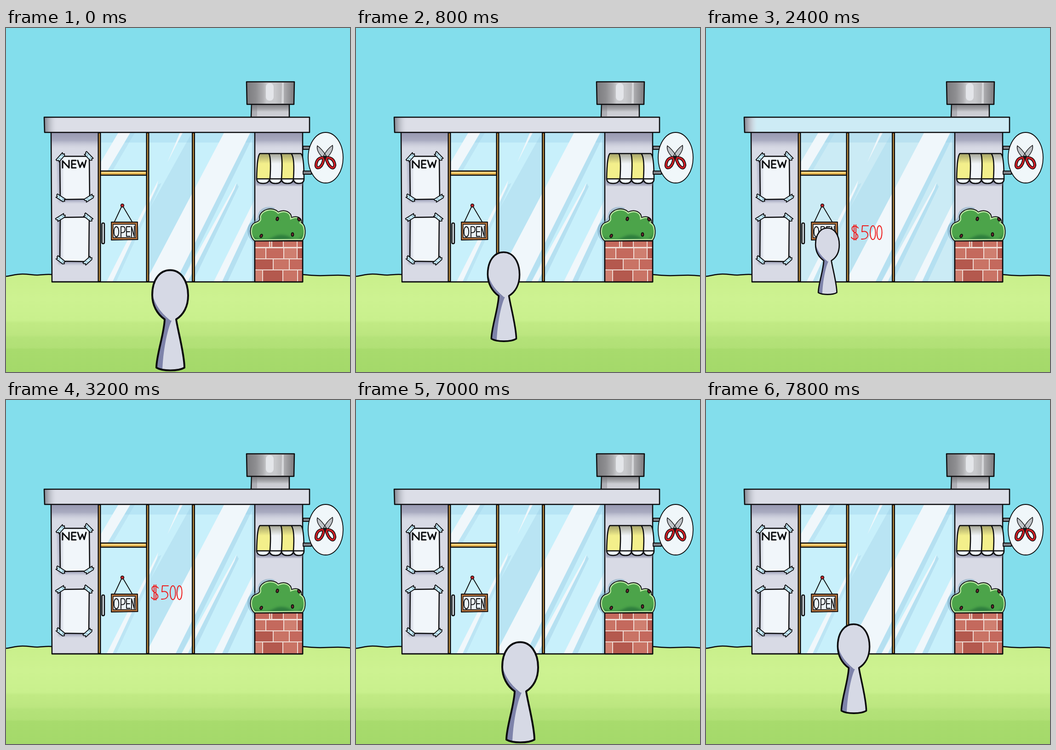
Recreate the animation shown at these times as an HTML page. Size 748 by 748 pixels, loop 8000 ms.

```html
<!DOCTYPE html>
<html lang="en">
<head>
<meta charset="utf-8">
<title>Barber shop</title>
<style>
  html, body { margin: 0; width: 100%; height: 100%; overflow: hidden; background: #83deec; }
  svg { display: block; width: 100vw; height: 100vh; }
  .ink { stroke: #0b0b0d; stroke-width: 2.5; stroke-linejoin: round; stroke-linecap: round; }
  .line { fill: none; }
  .thin { stroke-width: 1.8; }
  .fine { stroke-width: 1.4; }
  .bold { stroke-width: 3; }
</style>
</head>
<body>
<svg viewBox="0 0 748 748">
  <defs>
    <linearGradient id="grass" x2="0" y2="1">
      <stop offset="0" stop-color="#c9ef8b"/><stop offset=".25" stop-color="#cdf291"/>
      <stop offset=".47" stop-color="#c9f08d"/><stop offset=".5" stop-color="#c1ea84"/>
      <stop offset=".62" stop-color="#bce680"/><stop offset=".65" stop-color="#b4e279"/>
      <stop offset=".75" stop-color="#b1e076"/><stop offset=".77" stop-color="#a8db6d"/>
      <stop offset="1" stop-color="#a4d96a"/>
    </linearGradient>
    <linearGradient id="eaves" x2="0" y2="1">
      <stop offset="0" stop-color="#9697b0"/><stop offset=".45" stop-color="#a9abc0"/>
      <stop offset="1" stop-color="#d8dae5" stop-opacity="0"/>
    </linearGradient>
    <linearGradient id="roofShade">
      <stop offset="0" stop-color="#888b95"/><stop offset=".35" stop-color="#b4b7c1"/>
      <stop offset="1" stop-color="#dcdee7" stop-opacity="0"/>
    </linearGradient>
    <linearGradient id="steel">
      <stop offset="0" stop-color="#7a7a7d"/><stop offset=".2" stop-color="#8f8f92"/>
      <stop offset=".34" stop-color="#adadb0"/><stop offset=".42" stop-color="#c8c9cc"/>
      <stop offset=".6" stop-color="#c8c9cc"/><stop offset=".75" stop-color="#b5b5b8"/>
      <stop offset="1" stop-color="#7b7b7e"/>
    </linearGradient>
    <linearGradient id="duct" x2="0" y2="1">
      <stop offset="0" stop-color="#77777b"/><stop offset=".4" stop-color="#a9aaae"/>
      <stop offset=".6" stop-color="#cbccd2"/><stop offset="1" stop-color="#cfd0d7"/>
    </linearGradient>
    <linearGradient id="paper">
      <stop offset="0" stop-color="#c8ccd9"/><stop offset=".15" stop-color="#f1f6fa"/>
    </linearGradient>
    <linearGradient id="awningShade" x2="0" y2="1">
      <stop offset="0" stop-color="#6f6d52" stop-opacity=".6"/><stop offset=".4" stop-color="#6f6d52" stop-opacity="0"/>
    </linearGradient>
    <filter id="soft"><feGaussianBlur stdDeviation="2.5"/></filter>
    <clipPath id="panes"><path d="M204 227H541V552H204Z"/></clipPath>
    <path id="awningShape" d="M552 273H641Q648 277 648 328H545Q546 278 552 273Z"/>
    <path id="bushShape" d="M541 463C528 455 528 428 542 423C550 420 553 418 551 411C553 394 580 387 592 400C606 393 620 400 621 412C633 407 644 413 642 423C653 428 653 452 645 462Z"/>
    <clipPath id="bushClip"><use href="#bushShape"/></clipPath>
    <path id="grip" d="M691 282Q675 281 674 299Q675 306 682 303Q690 297 691 282ZM696 282Q713 281 715 298Q713 307 707 303Q699 297 696 282Z"/>
    <g id="tape">
      <path class="ink thin" fill="#c9ecf7" d="M-11-4H10L8-1L11 1L8 4H-10L-8 1L-11-1Z"/>
      <path d="M-5-3L-2 3M4-3L6 3" stroke="#7fa5ba" stroke-width="1.500"/>
    </g>
    <path id="figure" d="M-12-112C-29-124-39-143-39-165C-39-198-23-219 0-219C23-219 39-196 39-164C39-140 29-122 13-112C17-86 31-36 31-7C18 1-17 1-30-7C-30-34-13-81-12-112Z"/>
    <clipPath id="figureClip"><use href="#figure"/></clipPath>
  </defs>

  <rect width="748" height="748" fill="#83deec"/>
  <path fill="url(#grass)" d="M0 540C12 539 20 535 36 535S60 538 72 537S90 535 100 536H645C660 538 680 539 700 538S735 537 748 539V748H0Z"/>
  <path class="ink line" d="M0 540C12 539 20 535 36 535S60 538 72 537S90 535 100 536M645 536C660 538 680 539 700 538S735 537 748 539"/>

  <!-- chimney -->
  <path class="ink" fill="url(#duct)" d="M534 165H616V194H533Z"/>
  <path d="M534 167h12v25h-12z" fill="#77777b" opacity=".35"/>
  <path class="ink" fill="url(#steel)" d="M523 117H627L626 166H524Z"/>
  <rect x="565" y="120" width="17" height="38" rx="8" fill="#e3e5e9"/>
  <path d="M600 119h4v45h-5z" fill="#d5d6d9"/>

  <!-- walls -->
  <path fill="#d8dae5" d="M98 227H645V552H100Z"/>
  <path fill="url(#eaves)" d="M99 227H203V265H99ZM541 227H645V265H541Z"/>
  <path class="ink line" d="M98 227L100 552H645V227"/>

  <!-- windows -->
  <g clip-path="url(#panes)">
    <rect id="glass" x="204" y="227" width="337" height="325"/>
    <g fill="#b5e0f1">
      <path d="M311 395L404 228V362L311 537Z" opacity=".75"/>
      <path d="M270 228H280L232 310H220ZM331 340L338 337L240 551H231Z" opacity=".65"/>
      <path d="M530 228H541L382 551H367ZM502 338L506 345L407 551H396ZM541 400V424L482 551H469Z"/>
    </g>
    <path fill="#8fcbe3" opacity=".3" d="M204 227H541V249H204Z"/>
    <g fill="#f0f7fb">
      <path d="M244 228H270L221 310H206V292ZM378 228H384L351 292ZM331 331L328 345L232 551H219Z"/>
      <path d="M474 228H531L369 551H311V538ZM502 335L497 350L395 551H382ZM541 372V400L470 551H452Z"/>
    </g>
    <path d="M535 228h6v324h-6z" fill="#9bc9dc" opacity=".55"/>
  </g>
  <path class="ink" fill="#e5b34d" d="M205 311H306V320H205Z"/>
  <path d="M207 314H304" stroke="#ffe193" stroke-width="2"/>
  <g fill="none">
    <path stroke="#0b0b0d" stroke-width="7" d="M203 227V552M308 227V552M407.500 227V552"/>
    <path stroke="#c99643" stroke-width="2.200" d="M203 229V550M308 229V550M407.500 229V550"/>
  </g>
  <path class="ink line" d="M541 227V552M100 552H645"/>
  <rect class="ink" x="208.500" y="424" width="5.500" height="45" rx="2.700" fill="#dce6ec"/>

  <!-- roof -->
  <path id="roof" d="M83 194H660V227H84Z"/>
  <path fill="url(#roofShade)" d="M84 195H112V226H84Z"/>
  <path class="ink line" d="M83 194H660V227H84Z"/>

  <!-- notices -->
  <path fill="#a5a8c0" filter="url(#soft)" d="M112 283H180V378H115ZM112 414H179V513H114Z"/>
  <path class="ink" fill="url(#paper)" d="M117 279H181L182 372L118 373Z"/>
  <path class="ink" fill="url(#paper)" d="M118 412L181 411L180 508L117 507Z"/>
  <g id="tapes"></g>
  <path class="ink line bold" aria-label="NEW" d="M123 304V289L137 304V288M152 288H143V304H152M143 296H151M156 288L161 303L166 292L170 303L174 288"/>

  <!-- door sign -->
  <path class="ink line thin" d="M251 389L236 421M255 389L274 421"/>
  <circle class="ink fine" cx="253" cy="386" r="3.500" fill="#c5272c"/>
  <path class="ink thin" fill="#b5733c" d="M229 422L286 422L286.500 460L229 461Z"/>
  <path class="ink fine" fill="#e9f1f5" d="M233 427L281 426.500L282 455.500L233 456Z"/>
  <path class="ink line thin" aria-label="OPEN" d="M240 432C233 432 233 454 240 454S247 432 240 432M250 454V432Q259 430 259 438T250 445M270 432H262V453H270M262 443H269M273 454V432L279 454V431"/>

  <!-- awning -->
  <path fill="#8587a3" opacity=".8" filter="url(#soft)" d="M543 331H645V342H543Z"/>
  <use href="#awningShape" fill="#f1f5f9"/>
  <path fill="#f3ef8b" d="M552 273H572Q577 284 574 328H545Q546 278 552 273ZM598 273H620Q626 280 626 328H599Z"/>
  <use href="#awningShape" fill="url(#awningShade)"/>
  <path class="ink" fill="#eef4f8" d="M545 328H648Q648 338 637 338Q626 338 625 329Q624 338 612 338Q600 338 599 329Q598 338 586 338Q574 338 573 329Q571 338 559 338Q546 338 545 328Z"/>
  <path class="ink line" d="M545 328Q546 278 552 273H641Q648 277 648 328M572 274Q577 284 574 328M598 274Q602 284 599 328M621 274Q628 284 625 328"/>

  <!-- hanging sign -->
  <path class="ink thin" fill="#80858b" d="M646 257H660V264H646ZM646 311H664V318H646Z"/>
  <ellipse class="ink thin" cx="695" cy="282" rx="38" ry="55" fill="#f0f7fa"/>
  <path class="ink fine" fill="#bfc3c7" d="M677 256Q674 268 690 283L697 279Q688 264 677 256ZM710 255Q713 267 697 283L690 279Q698 263 710 255Z"/>
  <use href="#grip" fill="none" stroke="#0b0b0d" stroke-width="6.500"/>
  <use href="#grip" fill="none" stroke="#d21f25" stroke-width="3.600"/>
  <circle cx="693.500" cy="281" r="3.500" fill="#17171a"/>

  <!-- planter -->
  <path fill="#6f9fbb" opacity=".45" d="M541 467C522 458 518 426 539 420C545 417 548 411 548 406C552 389 572 386 584 391L560 463Z"/>
  <g id="bricks"></g>
  <path class="ink line" d="M541 463H645V552H541Z"/>
  <use href="#bushShape" fill="#4ca44a"/>
  <g clip-path="url(#bushClip)">
    <path filter="url(#soft)" fill="#2f7e3d" d="M533 452Q560 466 580 455T620 456T652 438V468H533Z"/>
    <use href="#bushShape" fill="none" stroke="#b9e7a1" stroke-width="7"/>
  </g>
  <use href="#bushShape" class="ink line thin"/>
  <g id="berries" class="ink thin" fill="#7b2f31"></g>

  <path id="price" aria-label="$500" fill="none" stroke="#ee1c1c" stroke-width="2" stroke-linecap="round" stroke-linejoin="round"
    d="M331 435Q327 430 321 431Q315 434 319 441L329 449Q333 457 325 459Q319 460 316 455M322 428V461M326 428V461M353 430H340L339 443Q351 440 352 450Q351 460 338 459M363 430C355 430 355 460 363 460S370 430 363 430M377 430C370 430 370 460 377 460S385 430 377 430"/>

  <g id="person">
    <use href="#figure" fill="#d6d9e5"/>
    <g clip-path="url(#figureClip)" fill="#7e83aa">
      <path d="M-42-180C-35-143-20-127 0-110L-20-104L-44-130Z"/>
      <path d="M-14-113L3-109C-7-88-16-40-17 2H-34Z"/>
    </g>
    <use href="#figure" class="ink line" style="stroke-width:4"/>
  </g>
</svg>
<script>
const $ = id => document.getElementById(id);
const rect = (x, y, w, h, fill) => `<rect x="${x}" y="${y}" width="${w}" height="${h}" fill="${fill}"/>`;

$('tapes').innerHTML = [
  [119, 281, -48], [180, 279, 46], [119, 370, 32], [181, 370, -32],
  [119, 412, -32], [179, 412, 38], [119, 505, 38], [178, 506, -42]
].map(([x, y, a]) => `<use href="#tape" transform="translate(${x} ${y}) rotate(${a})"/>`).join('');

// Brick rows: top, bottom, joints
const tones = ['#c4695d', '#cf7f70', '#b4594e', '#c97365'];
$('bricks').innerHTML = rect(541, 463, 104, 89, '#f0dcd5') + [
  [463, 476, 573, 578, 603, 633],
  [479, 501, 565, 604, 633],
  [503, 525, 581, 616],
  [527, 552, 558, 602, 634]
].map(([top, bottom, ...joints], row) => {
  const edges = [540, ...joints, 646];
  return joints.concat(0).map((_, i) =>
    rect(edges[i] + 1, top, edges[i + 1] - edges[i] - 2, bottom - top, tones[(row * 3 + i) % 4])).join('');
}).join('');

$('berries').innerHTML = [[590, 415, 15], [637, 416, -25], [555, 452, 25], [623, 449, 0]]
  .map(([x, y, a]) => `<ellipse rx="2.500" ry="3.800" transform="translate(${x} ${y}) rotate(${a})"/>`).join('');

// Each pose: start time, foot x, foot y, scale
const poses = [
  [0, 357, 745.5, 1], [800, 321, 682, .888], [1600, 290, 621, .775], [2400, 264, 580, .662],
  [3200, 0, 0, 0], [7000, 357, 745.5, 1], [7800, 321, 682, .888]
];

function draw(now) {
  const t = now % 8000;
  const [, x, y, scale] = poses.findLast(p => p[0] <= t);
  const paying = t >= 2400 && t < 3200;
  $('person').setAttribute('transform', `translate(${x} ${y}) scale(${scale})`);
  $('person').style.display = scale ? '' : 'none';
  $('price').style.display = t >= 2400 && t < 4000 ? '' : 'none';
  $('price').setAttribute('transform', `translate(0 ${paying ? 0 : -26})`);
  $('roof').setAttribute('fill', paying ? '#cdebf5' : '#dcdee7');
  $('glass').setAttribute('fill', paying ? '#cbebf5' : '#c8f0fb');
  requestAnimationFrame(draw);
}
draw(performance.now());
</script>
</body>
</html>
```
